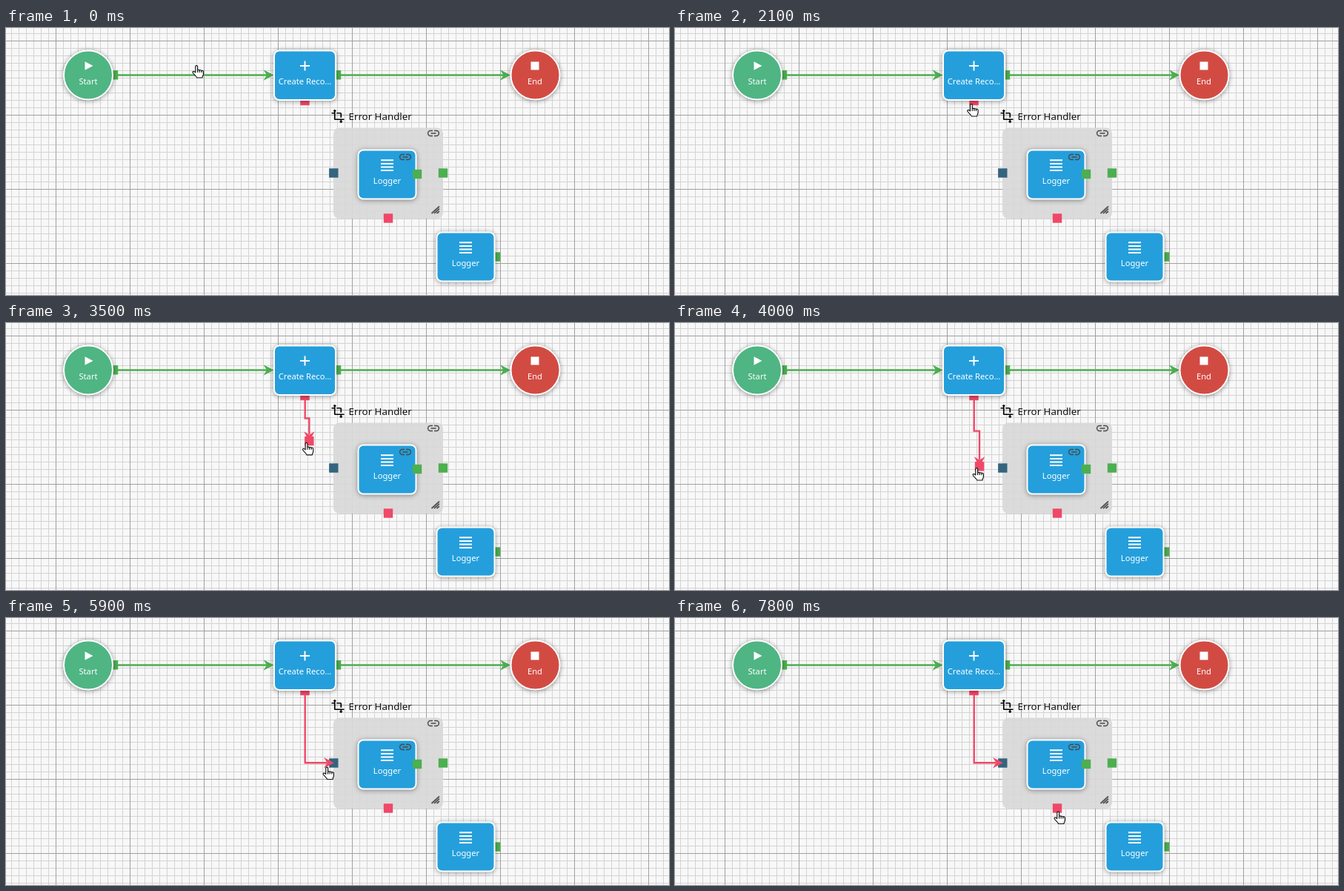
An HTML page for the animation above (8000 ms loop, 895 by 360 pixels).

```html
<!DOCTYPE html>
<html lang="en">
<head>
<meta charset="utf-8">
<title>Flow editor</title>
<style>
  html, body { margin: 0; width: 100%; height: 100%; overflow: hidden; background: #f8f8f8; }
  svg { display: block; width: 100%; height: 100%; }
  text { font: 11.2px "Noto Sans", "Open Sans", sans-serif; fill: #fff; text-anchor: middle; }
  .title { font-size: 13.3px; fill: #111; text-anchor: start; }
  .node { stroke: #fff; stroke-width: 2; filter: drop-shadow(0 1px 3px rgba(0, 0, 0, .4)); }
  .blue { fill: #249fdc; }
  .green { fill: #4caf50; }
  .red { fill: #ef4868; }
  .wire { fill: none; stroke-width: 2.4; }
</style>
</head>
<body>
<svg viewBox="0 0 895 360">
  <defs>
    <pattern id="minor" x="7" y="7" width="10" height="10" patternUnits="userSpaceOnUse">
      <path d="M.5 0V10M0 .5H10" stroke="#d3d3d3"/>
    </pattern>
    <pattern id="major" x="67" y="17" width="100" height="100" patternUnits="userSpaceOnUse">
      <path d="M.5 0V100M0 .5H100" stroke="#a0a0a0"/>
    </pattern>
    <rect id="port" x="-6.2" y="-6.2" width="12.4" height="12.4"/>
    <path id="head" d="M0 0L-14 -7.2L-9.5 0L-14 7.2Z"/>
    <g id="link" fill="none" stroke="#4a4a4a" stroke-width="1.5">
      <path d="M-1 -3.4H-4A3.4 3.4 0 0 0 -4 3.4H-1M1 -3.4H4A3.4 3.4 0 0 1 4 3.4H1M-3.5 0H3.5"/>
    </g>
    <g id="logger">
      <rect class="node blue" x="-39" y="-33" width="78" height="66" rx="7"/>
      <path d="M-8.5 -19.2H8.5M-8.5 -14.6H8.5M-8.5 -10H8.5M-8.5 -5.4H8.5" stroke="#fff" stroke-width="2"/>
      <text y="12.5">Logger</text>
    </g>
  </defs>

  <rect width="895" height="360" fill="#f8f8f8"/>
  <rect width="895" height="360" fill="url(#minor)"/>
  <rect width="895" height="360" fill="url(#major)"/>

  <!-- main flow -->
  <g class="green">
    <path class="wire" stroke="#4caf50" d="M148 63.5H353M450 63.5H672"/>
    <use href="#head" x="361.5" y="63.5"/>
    <use href="#head" x="681" y="63.5"/>
    <use href="#port" x="145" y="63.3"/>
    <use href="#port" x="446" y="63.3"/>
    <use href="#port" x="661" y="308.5"/>
  </g>
  <use href="#port" class="red" x="403.5" y="98"/>
  <circle class="node" cx="111" cy="63.5" r="33" fill="#4fb583"/>
  <path d="M106.5 45.3L117.5 51L106.5 56.7Z" fill="#fff"/>
  <text x="111" y="76">Start</text>
  <rect class="node blue" x="362" y="30.5" width="83" height="66.5" rx="7"/>
  <path d="M397 51H410M403.5 44.5V57.5" stroke="#fff" stroke-width="1.9"/>
  <text x="403.5" y="76">Create Reco…</text>
  <circle class="node" cx="714.5" cy="63.5" r="33" fill="#d24b43"/>
  <rect x="708.5" y="45.5" width="11" height="11" fill="#fff"/>
  <text x="714" y="76">End</text>

  <!-- error handler -->
  <path transform="translate(437.8 108.8) scale(.85)" d="M22 18v-2H8V4h2L7 1 4 4h2v2H2v2h4v8c0 1.1.9 2 2 2h8v2h-2l3 3 3-3h-2v-2h4zM10 8h6v6h2V8c0-1.1-.9-2-2-2h-6v2z"/>
  <text class="title" x="462.5" y="123.7">Error Handler</text>
  <rect id="group" x="442" y="134.5" width="148" height="122.5" rx="8" fill="#d9d9d9" fill-opacity=".92"/>
  <use href="#link" x="577" y="142"/>
  <path d="M574.5 250L585 240.5M578 250L585 243.7M581.5 250L585 247" stroke="#555" stroke-width="1.8"/>
  <use href="#logger" x="514.5" y="197.5"/>
  <use href="#link" x="539" y="174"/>
  <use href="#port" class="green" x="555" y="197"/>
  <use href="#port" class="green" x="590" y="195.5"/>
  <use href="#port" class="red" x="516" y="256.5"/>
  <use href="#port" id="input" x="442.3" y="195.5" fill="#35647e"/>
  <rect id="dropZone" x="433.5" y="186.5" width="18" height="18" fill="none" stroke="#35647e"
        stroke-width="2.8" stroke-dasharray="6 3" stroke-dashoffset="3"/>
  <use href="#logger" x="620.5" y="308.5"/>

  <!-- dragged connection -->
  <g id="connection" class="red">
    <path id="wire" class="wire" stroke="#ef4868"/>
    <use id="arrow" href="#head"/>
    <use id="handle" href="#port"/>
  </g>

  <path id="hand" fill="#fff" stroke="#111" stroke-width="1.15" stroke-linejoin="round"
        d="M4.8 10V2A1.4 1.4 0 0 1 7.6 2V7.2C7.6 6 10.2 6 10.2 7.4C10.2 6.4 12.8 6.5 12.8 8C12.8 7 15.4 7.2 15.4 8.8V12.2C15.4 14.2 14 15 14 17H6.6C6.4 15 2.4 12.5 1.2 10.2C.6 8.6 2.6 8 3.6 9ZM7.6 7V10M10.2 7.6V10M12.8 8.2V10"/>
</svg>
<script>
  const LOOP = 8000, TICK = 100;
  const GRAB = 2900, HOVER = 4300, DROP = 5900;

  // time, x, y of the pointer
  const pointerKeys = [
    [0, 251, 50], [400, 251, 50], [900, 345, 119], [1000, 345, 119],
    [1200, 374, 109], [1400, 384, 102.5], [1500, 384, 102.5], [1700, 393, 102],
    [1900, 393, 102], [2200, 394, 102], [2900, 394, 103], [3100, 396, 106.5],
    [3700, 401, 188], [3800, 401, 196], [3900, 401, 196], [4000, 401, 195],
    [4100, 401, 195], [4300, 421, 200], [4500, 429, 202], [4600, 429, 202],
    [4700, 427, 200.5], [6000, 427, 200.5], [6100, 426, 201], [6500, 426, 201],
    [6600, 428, 226], [6700, 428, 226], [6900, 438, 258], [7100, 474, 289],
    [7400, 512, 262], [7700, 512, 262], [7800, 511, 260.5], [8000, 511, 260.5]
  ];

  const el = id => document.getElementById(id);
  const show = (id, on) => el(id).setAttribute("visibility", on ? "visible" : "hidden");
  const place = (id, x, y, angle = 0) =>
    el(id).setAttribute("transform", `translate(${x} ${y}) rotate(${angle})`);

  function pointerAt(t) {
    const i = pointerKeys.findIndex(key => key[0] > t);
    const [t0, x0, y0] = pointerKeys[i - 1], [t1, x1, y1] = pointerKeys[i];
    const p = (t - t0) / (t1 - t0);
    return [x0 + (x1 - x0) * p, y0 + (y1 - y0) * p];
  }

  function drawConnection(t, x, y) {
    const start = "M403.7 102V";
    if (t >= DROP) {
      el("wire").setAttribute("d", start + "195.3H433");
      place("arrow", 443, 195.3);
    } else if (t >= HOVER) {
      el("wire").setAttribute("d", `${start}${y - 32}H${x - 37}V${y}H${x - 9}`);
      place("arrow", x, y);
    } else {
      const bend = Math.max(102, (98 + y) / 2);
      el("wire").setAttribute("d", `${start}${bend}H${x}V${Math.max(bend, y - 9)}`);
      place("arrow", x, y + 1, 90);
    }
    place("handle", x, y);
  }

  function draw(t) {
    const [x, y] = pointerAt(t);
    const hovering = t >= HOVER && t < DROP;
    place("hand", x, y);
    show("connection", t >= GRAB);
    show("handle", t >= GRAB && t < DROP);
    show("dropZone", hovering);
    show("input", !hovering);
    if (t >= GRAB) drawConnection(t, x + 10, y - 1.7);
    el("group").style.filter =
      t >= 6600 && t < 6900 ? "drop-shadow(0 2px 3px rgba(0, 0, 0, .2))" : "none";
  }

  const began = performance.now();
  function frame() {
    const t = (performance.now() - began) % LOOP;
    draw(Math.floor(t / TICK) * TICK);
    requestAnimationFrame(frame);
  }
  frame();
</script>
</body>
</html>
```
